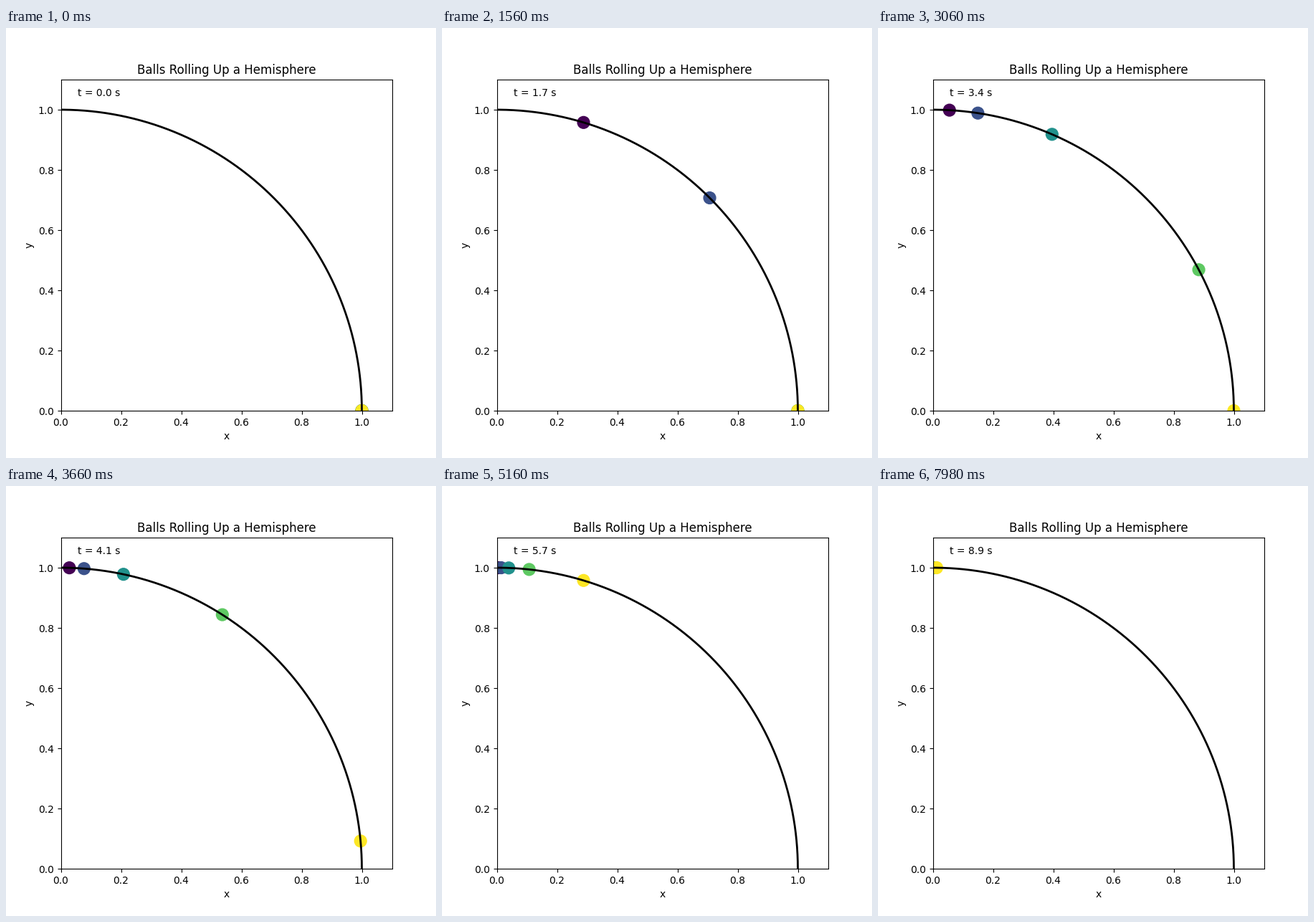
Animation of 600x600 px, one loop 8 s. Source, as a matplotlib script:

```python
import numpy as np
import matplotlib.pyplot as plt
from matplotlib.animation import FuncAnimation

LOOP_MS = 8000
STEPS = 267
FPS = 30
BALLS = 5
DELAY = 1.0      # seconds between two starts
RADIUS = 0.02


def ball_pos(t):
    """Ball with just enough energy to reach the top of a unit circle."""
    angle = 4 * np.arctan(np.tan(np.pi / 8) * np.exp(-max(t, 0.0)))
    return np.sin(angle), np.cos(angle)


fig, ax = plt.subplots(figsize=(6, 6), dpi=100)
ax.set_aspect("equal")
ax.set_xlim(0, 1.1)
ax.set_ylim(0, 1.1)
ax.set_xlabel("x")
ax.set_ylabel("y")
ax.set_title("Balls Rolling Up a Hemisphere")

arc = np.linspace(0, np.pi / 2, 200)
ax.plot(np.cos(arc), np.sin(arc), "k", lw=2)

colors = plt.cm.viridis(np.linspace(0, 1, BALLS))
balls = [ax.add_patch(plt.Circle((1, 0), RADIUS, color=c)) for c in colors]
clock = ax.text(0.05, 0.95, "", transform=ax.transAxes)


def update(step):
    t = step / FPS
    for i, ball in enumerate(balls):
        ball.center = ball_pos(t - i * DELAY)
    clock.set_text(f"t = {t:.1f} s")
    return [*balls, clock]


anim = FuncAnimation(fig, update, frames=STEPS, init_func=lambda: update(0),
                     interval=LOOP_MS / STEPS, repeat=True, repeat_delay=0,
                     blit=False, cache_frame_data=False)
plt.show()
```
